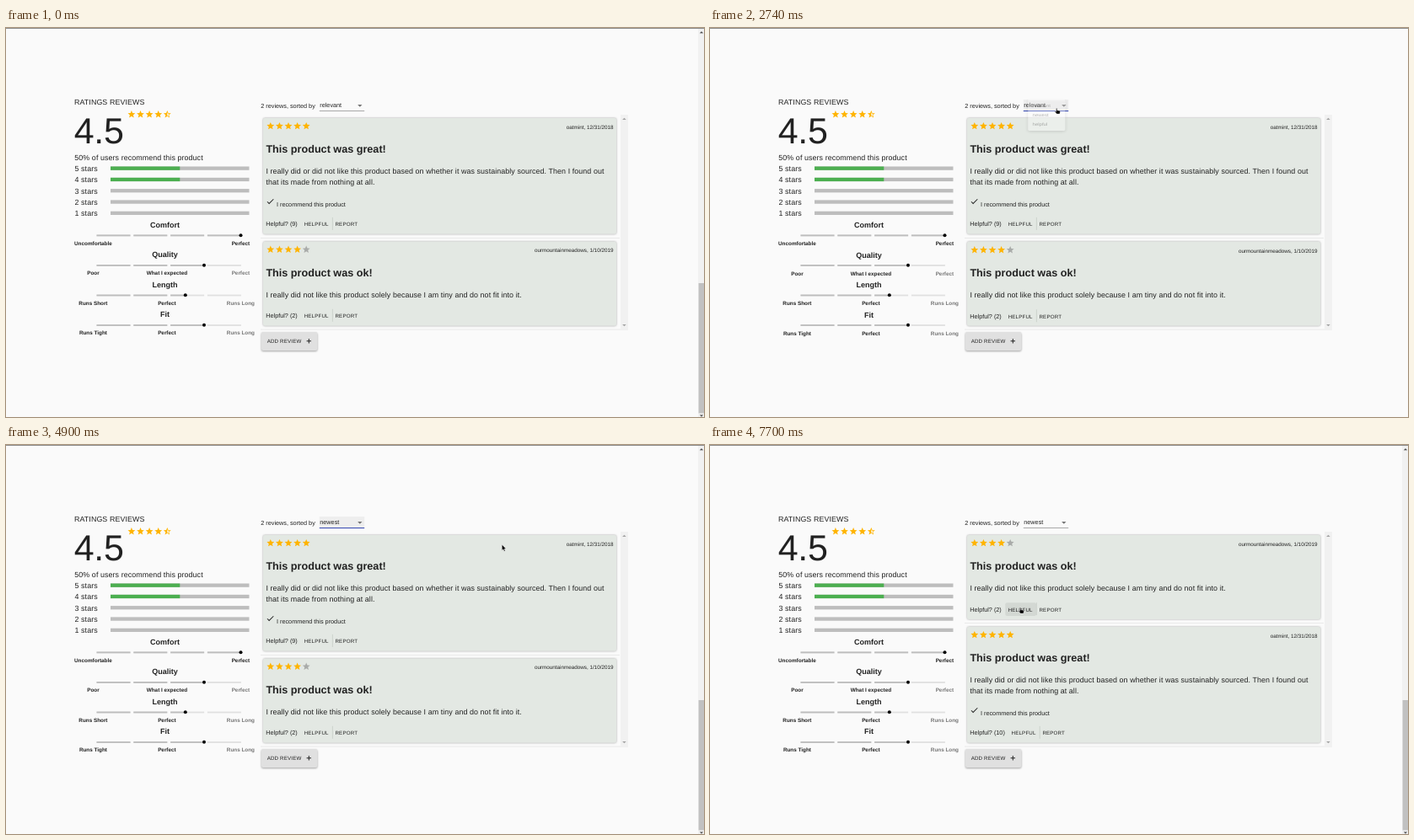
An HTML page that plays this animation: 828 by 462 pixels, repeating every 8000 ms.

```html
<!DOCTYPE html>
<html lang="en">
<head>
<meta charset="utf-8">
<title>Ratings and reviews</title>
<style>
html, body { margin: 0; width: 100%; height: 100%; overflow: hidden; background: #fafafa; }
svg { display: block; width: 828px; height: 462px; }
text { font-family: "Liberation Sans", Arial, sans-serif; fill: #212121; text-rendering: geometricPrecision; white-space: pre; }
.body { font-size: 8.88px; letter-spacing: .00938em; }
.score { font-size: 43px; letter-spacing: -.00833em; }
.title { font-size: 12.64px; font-weight: 700; }
.small { font-size: 7.25px; }
.meta { font-size: 6.32px; text-anchor: end; }
.button { font-size: 6.17px; letter-spacing: .02857em; }
.trait { font-size: 9px; font-weight: 700; text-anchor: middle; }
.scale { font-size: 6.35px; font-weight: 700; text-anchor: middle; }
.faded { fill: #777; }
.card { filter: drop-shadow(0 .7px .8px rgba(0,0,0,.35)); }
.raised { filter: drop-shadow(0 1px 1.2px rgba(0,0,0,.35)); }
.popup { filter: drop-shadow(0 2px 2.5px rgba(0,0,0,.35)); }
</style>
</head>
<body>
<svg id="stage" viewBox="0 0 828 462" xmlns="http://www.w3.org/2000/svg"></svg>
<script>
const LOOP = 8000;
const STAR = 'M12 17.27L18.18 21l-1.64-7.03L22 9.24l-7.19-.61L12 2 9.19 8.63 2 9.24l5.46 4.73L5.82 21z';
const HALF = 'M22 9.24l-7.19-.62L12 2 9.19 8.63 2 9.24l5.46 4.73L5.82 21 12 17.27 18.18 21l-1.63-7.03L22 9.24zM12 15.4V6.1l1.71 4.04 4.38.38-3.32 2.88 1 4.28L12 15.4z';
const CHECK = 'M9 16.17L4.83 12l-1.42 1.41L9 19 21 7l-1.41-1.41z';
const GOLD = '#ffb400';

const text = (x, y, cls, s, extra = '') => `<text x="${x}" y="${y}" class="${cls}" ${extra}>${s}</text>`;
const rect = (x, y, w, h, fill, extra = '') =>
  `<rect x="${x}" y="${y}" width="${w}" height="${h}" fill="${fill}" ${extra}/>`;
const icon = (x, y, scale, d, fill) =>
  `<path transform="translate(${x} ${y}) scale(${scale})" d="${d}" fill="${fill}"/>`;
const triangle = (x, y, w, h, fill) => `<path d="M${x - w} ${y}h${2 * w}l${-w} ${h}z" fill="${fill}"/>`;

function stars(x, y, count) {
  let out = '';
  for (let i = 0; i < 5; i++) {
    const half = count - i === .5;
    out += icon(x + i * 10.6, y, .442, half ? HALF : STAR, count > i ? GOLD : '#a9aba9');
  }
  return out;
}

function summary() {
  let out = text(81, 91.2, 'body', 'RATINGS REVIEWS') + text(80.8, 137, 'score', '4.5') +
    stars(143.6, 97.2, 4.5) + text(81.3, 156.6, 'body', '50% of users recommend this product');
  for (let i = 0; i < 5; i++) {
    const y = 170 + i * 13.3;
    out += text(81.5, y, 'body', `${5 - i} stars`) + rect(124, y - 5.5, 164.5, 4.3, '#bdbdbd');
    if (i < 2) out += rect(124, y - 5.5, 82.3, 4.3, '#4caf50');
  }
  return out;
}

const traits = [
  { name: 'Comfort', value: 278.5, labels: ['Uncomfortable', '', 'Perfect'] },
  { name: 'Quality', value: 235, labels: ['Poor', 'What I expected', 'Perfect'] },
  { name: 'Length', value: 212.8, labels: ['Runs Short', 'Perfect', 'Runs Long'] },
  { name: 'Fit', value: 235, labels: ['Runs Tight', 'Perfect', 'Runs Long'] }
];

function traitTracks() {
  return traits.map(({ value }, row) => {
    const y = 246.4 + row * 35.55;
    let out = '';
    for (let i = 0; i < 4; i++) {
      const x = 107.5 + i * 43.8, filled = Math.max(0, Math.min(40, value - x));
      out += rect(x, y - .9, 40, 1.8, '#e0e0e0') + rect(x, y - .9, filled, 1.8, '#bdbdbd');
    }
    return out + `<circle cx="${value}" cy="${y - .2}" r="2"/>`;
  }).join('');
}

function traitLabels() {
  return traits.map(({ name, labels }, row) => {
    const y = row * 35.55;
    return text(188.5, 236.6 + y, 'trait', name) + labels.map((label, i) =>
      text(103.4 + i * 87.5, 257.8 + y, 'scale' + (i === 2 && row ? ' faded' : ''), label)).join('');
  }).join('');
}

const reviews = {
  great: {
    height: 137.8, rating: 5, title: 'This product was great!', by: 'oatmint, 12/31/2018', recommended: true,
    lines: ['I really did or did not like this product based on whether it was sustainably sourced. Then I found out',
      'that its made from nothing at all.']
  },
  ok: {
    height: 100, rating: 4, title: 'This product was ok!', by: 'ourmountainmeadows, 1/10/2019',
    lines: ['I really did not like this product solely because I am tiny and do not fit into it.']
  }
};

function card(review, top, helpful, cls = '') {
  const base = top + review.height - 9.4, dx = helpful > 9 ? 3.9 : 0;
  let out = rect(305, top, 419, review.height, '#e3e8e3', 'rx="2" class="card"') + `<g class="${cls}">` +
    stars(308.5, top + 4, review.rating) + text(720.6, top + 12.5, 'meta', review.by) +
    text(308.4, top + 40.8, 'title', review.title);
  review.lines.forEach((line, i) => out += text(308.4, top + 66 + i * 13.3, 'body', line));
  if (review.recommended) {
    out += icon(308, top + 93.4, .46, CHECK, '#212121') +
      text(321, top + 104.5, 'small', 'I recommend this product');
  }
  return out + text(308.3, base, 'small', `Helpful? (${helpful})`) +
    text(353.7 + dx, base - .1, 'button', 'HELPFUL') +
    rect(386.9 + dx, base - 10.5, .7, 15, '#c4c9c4') +
    text(390.5 + dx, base - .1, 'button', 'REPORT') + '</g>';
}

const divider = (y, w = 426) => rect(302, y, w, .7, '#e2e2e2');

function innerScrollbar() {
  return rect(729, 103, 9, 255, '#f1f1f1') +
    triangle(733.4, 109, 2.3, -2.3, '#a3a3a3') + triangle(733.4, 352, 2.3, 2.3, '#a3a3a3');
}

function addButton() {
  return rect(303, 361, 66.3, 22, '#e0e0e0', 'rx="2" class="raised"') +
    text(309.7, 374.1, 'button', 'ADD REVIEW') +
    '<path d="M356.6 371.8h5.4M359.3 369.1v5.4" stroke="#212121" stroke-width="1"/>';
}

function menu() {
  return rect(372.7, 81, 53.3, 54, '#fff', 'rx="2" class="popup"') +
    rect(372.7, 84.2, 53.3, 15.7, '#ebebeb') + rect(372.7, 99.9, 53.3, 15.7, '#f5f5f5', 'id="itemHover"') +
    ['relevant', 'newest', 'helpful'].map((s, i) => text(379.2, 94.4 + i * 15.8, 'small', s)).join('');
}

const stage = document.getElementById('stage');
stage.innerHTML = rect(0, 0, 828, 462, '#fafafa') + summary() + traitTracks() +
  `<g class="shift">${traitLabels()}</g>` +
  text(302.3, 94.5, 'small', '2 reviews, sorted by') +
  rect(371.8, 85, 53.4, 13.5, '#eee', 'id="selectBack"') +
  text(372.3, 94.4, 'small', '', 'id="selected"') +
  triangle(419.8, 91, 2.7, 2.7, '#757575') +
  rect(371.8, 98, 53.4, .8, '#949494', 'id="underline"') +
  `<g id="relevant">${card(reviews.great, 107, 9)}${divider(249)}${card(reviews.ok, 253.7, 2, 'shift')}</g>` +
  `<g id="newest">${rect(305, 107, 1, 1, 'none')}${card(reviews.ok, 107, 2)}${divider(211.3)}${card(reviews.great, 216, 10)}` +
  rect(350.3, 187.3, 36.6, 15.7, '#000', 'id="buttonHover" rx="2" opacity=".07"') + '</g>' +
  divider(357.7, 436) + innerScrollbar() + addButton() +
  `<g id="pageBar">${rect(821, 0, 7, 462, '#f1f1f1')}${rect(821.6, 303, 6.4, 154.5, '#c1c1c1')}` +
  triangle(825, 6.3, 2.2, -2.4, '#505050') + triangle(825, 459.5, 2.2, 2.2, '#505050') + '</g>' +
  rect(0, 0, 828, .8, '#777') +
  `<g id="menu">${menu()}</g>` +
  `<g id="cursor" stroke="#fff" stroke-width=".45" stroke-linejoin="round">
    <path id="arrow" d="M.3 .2V7.2L1.9 5.8 3 8.2 4.2 7.7 3.1 5.3H5.2z"/>
    <path id="hand" d="M.6 .8Q1.2 -.2 1.8 .8V2.7L4.6 3.2Q5.5 3.5 5.4 4.4L4.9 7.1H1.3L-.9 4.4Q-.9 3.5 .1 4L.6 4.4z"/>
    <path id="beam" stroke="#212121" stroke-width=".7" fill="none" d="M-1.3 -4H1.3M0 -4V4M-1.3 4H1.3"/>
  </g>`;

const el = id => document.getElementById(id);
const show = (id, on) => el(id).setAttribute('display', on ? 'inline' : 'none');
const within = (t, a, b) => t >= a && t < b;
const ramp = (t, a, b) => Math.max(0, Math.min(1, (t - a) / (b - a)));
const shifted = document.querySelectorAll('.shift');

// Each move runs in hard steps; the optional bend is a quadratic control point.
const moves = [
  { from: 1200, to: 2200, steps: 9, end: [410, 95], bend: [300, 338] },
  { from: 3440, to: 3840, steps: 4, end: [404, 111] },
  { from: 4600, to: 4900, steps: 3, end: [588, 118] },
  { from: 5040, to: 5040, steps: 1, end: [590, 126] },
  { from: 5170, to: 5600, steps: 4, end: [563, 186] },
  { from: 5870, to: 6140, steps: 3, end: [469, 156] },
  { from: 6440, to: 6440, steps: 1, end: [453.5, 170] },
  { from: 6600, to: 7440, steps: 6, end: [365, 192] },
  { from: 7600, to: 7700, steps: 2, end: [367, 193] }
];

function pointer(t) {
  let p = [188, 5];
  for (const { from, to, steps, end, bend } of moves) {
    if (t < from) break;
    const tick = (to - from) / (steps - 1 || 1) || 1;
    const u = Math.min(1, (Math.floor((t - from) / tick + 1e-6) + 1) / steps);
    p = p.map((a, i) => {
      const c = bend ? bend[i] : (a + end[i]) / 2;
      return (1 - u) ** 2 * a + 2 * u * (1 - u) * c + u * u * end[i];
    });
  }
  return p;
}

function draw(t) {
  const [x, y] = pointer(t);
  const modal = within(t, 2740, 4800);
  const sorted = t >= 4600;
  const focused = within(t, 2740, 7300);
  const inBox = (x0, y0, x1, y1) => within(x, x0, x1) && within(y, y0, y1);
  const overSelect = !modal && inBox(372, 85, 426, 99);
  const overHelpful = t >= 5040 && inBox(350, 187, 387, 203);

  show('relevant', t < 5040);
  show('newest', t >= 5040);
  show('buttonHover', overHelpful);
  show('pageBar', !modal);
  shifted.forEach(g => g.setAttribute('transform', `translate(0 ${modal ? .45 : 0})`));

  el('selected').textContent = sorted ? 'newest' : 'relevant';
  show('selectBack', focused);
  const line = el('underline');
  line.setAttribute('fill', focused ? '#3f51b5' : overSelect ? '#212121' : '#949494');
  line.setAttribute('height', focused || overSelect ? 1.1 : .8);

  const opening = 1 - (1 - ramp(t, 2700, 3050)) ** 3;
  show('menu', modal);
  el('menu').setAttribute('opacity', opening * (1 - ramp(t, 4560, 4760)));
  const sx = .75 + .25 * opening, sy = .56 + .44 * opening;
  el('menu').setAttribute('transform', `translate(399 92) scale(${sx} ${sy}) translate(-399 -92)`);
  show('itemHover', modal && y >= 100);

  const hand = overSelect || overHelpful || within(t, 2740, 4600);
  const beam = !hand && inBox(308, 165, 612, 175);
  show('cursor', t >= 500);
  show('hand', hand);
  show('beam', beam);
  show('arrow', !hand && !beam);
  el('cursor').setAttribute('transform', `translate(${x} ${y})`);
}

const start = performance.now();
function loop() {
  draw((performance.now() - start) % LOOP);
  requestAnimationFrame(loop);
}
loop();
</script>
</body>
</html>
```
